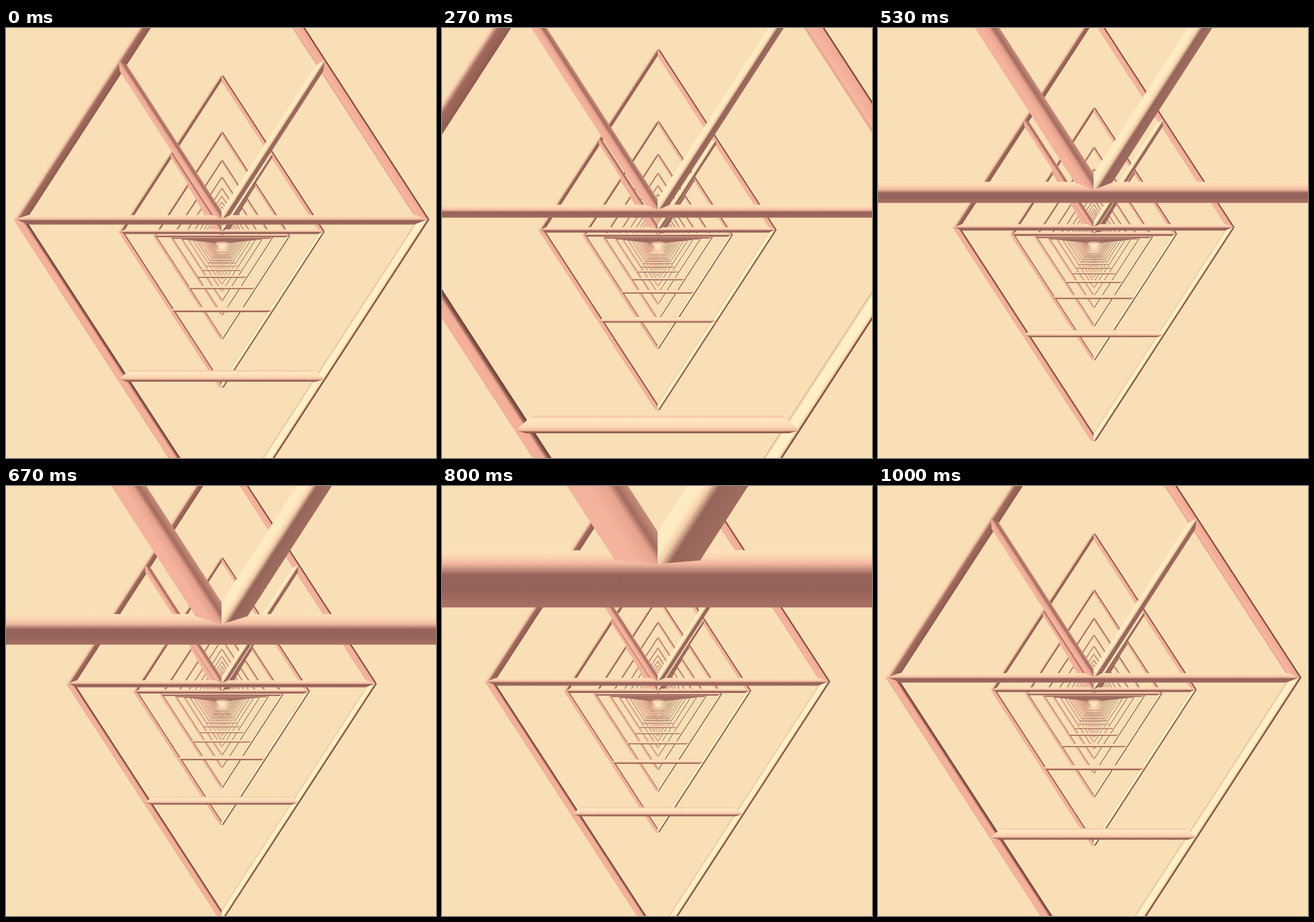
Recreate the animation shown at these times as an HTML page with a canvas. Size 748 by 748 pixels, loop 1.07 s.

```html
<!DOCTYPE html>
<html lang="en">
<head>
<meta charset="utf-8">
<title>Diamond tunnel</title>
<style>
html, body { margin: 0; width: 100%; height: 100%; overflow: hidden; background: #f8dfb5; }
canvas { display: block; }
</style>
</head>
<body>
<canvas id="stage" width="748" height="748"></canvas>
<script>
const ctx = document.getElementById('stage').getContext('2d');
const SIZE = 748, CENTER = 375, FOCAL = 345;
const RINGS = 34, LOOP = 1070, STEPS = 15;

// Ring geometry, in pixels at depth FOCAL
const FRAME_R = 6.8, BAR_R = 8.2;
const HALF_W = 349, HALF_H = 537.5, MID_Y = -41, LOW_Y = 229;
const STEEP = HALF_H / HALF_W, FLAT = 1 / STEEP, BLUNT = -.5;

// Colours across a tube: -1 first edge, 0 front ridge, 1 second edge
const shades = {
  upperLeft: [[-1, '#f3c5a4'], [-.5, '#fbdcb4'], [.08, '#e0a892'], [.3, '#a06a5c'], [1, '#8f5c50']],
  upperRight: [[-1, '#e5a28d'], [-.75, '#f7b7a0'], [0, '#f0a994'], [.3, '#8a5549'], [1, '#6b4037']],
  lowerLeft: [[-1, '#e9a38d'], [-.3, '#f6b39b'], [.55, '#f3ae98'], [.8, '#8a5549'], [1, '#6b4037']],
  lowerRight: [[-1, '#dcb08c'], [-.8, '#fff0c8'], [-.2, '#fff0c8'], [0, '#f3cba6'], [.3, '#8c5d4d'], [1, '#70483b']],
  middle: [[-1, '#fde2ba'], [-.5, '#fbd5b0'], [0, '#f0b79f'], [.25, '#96645a'], [.6, '#95635a'], [1, '#a97064']],
  low: [[-1, '#f3c3a2'], [-.75, '#fee8c2'], [-.2, '#fbd6b2'], [.1, '#eab398'], [.45, '#9c685a'], [1, '#85564a']],
  armLeft: [[-1, '#f3b39c'], [-.5, '#f5b39c'], [0, '#e6a28e'], [.4, '#a26b5e'], [1, '#c98f7c']],
  armRight: [[-1, '#fdecc2'], [-.3, '#fdeac0'], [.05, '#f3cda8'], [.3, '#95655a'], [1, '#a06c5f']]
};

// Round tube parallel to the screen. Each cut holds how far the two
// edges run past the end, as a multiple of their offset from the axis.
function tube(depth, radius, [x1, y1], [x2, y2], startCut, endCut, shade) {
  const len = Math.hypot(x2 - x1, y2 - y1);
  const dx = (x2 - x1) / len, dy = (y2 - y1) / len;
  const nx = -dy, ny = dx;
  const p = nx * x1 + ny * y1, dist = Math.hypot(p, depth);
  const sin = radius / dist, cos = Math.sqrt(1 - sin * sin);

  const silhouette = side => ({
    off: radius * (side * cos * depth - sin * p) / dist,
    z: depth - radius * (side * cos * p + sin * depth) / dist
  });
  const first = silhouette(-1), second = silhouette(1);
  const ridge = { off: 0, z: depth - radius };

  const project = (x, y, dir, edge, cut) => {
    const ext = dir * cut * Math.abs(edge.off), s = FOCAL / edge.z;
    return [CENTER + (x + nx * edge.off + dx * ext) * s,
            CENTER + (y + ny * edge.off + dy * ext) * s];
  };
  const start = (edge, cut) => project(x1, y1, -1, edge, cut);
  const end = (edge, cut) => project(x2, y2, 1, edge, cut);

  const across = edge => (p + edge.off) * FOCAL / edge.z;
  const a = across(first), b = across(second);
  const mid = (across(ridge) - a) / (b - a);
  const fill = ctx.createLinearGradient(
    CENTER + nx * a, CENTER + ny * a, CENTER + nx * b, CENTER + ny * b);
  for (const [t, color] of shade) {
    const stop = t < 0 ? mid * (1 + t) : mid + (1 - mid) * t;
    fill.addColorStop(Math.min(1, Math.max(0, stop)), color);
  }

  ctx.fillStyle = fill;
  ctx.beginPath();
  for (const point of [
    start(first, startCut[0]), start(ridge, 0), start(second, startCut[1]),
    end(second, endCut[1]), end(ridge, 0), end(first, endCut[0])
  ]) ctx.lineTo(...point);
  ctx.fill();
}

function drawRing(depth) {
  const top = [0, MID_Y - HALF_H], bottom = [0, MID_Y + HALF_H];
  const left = [-HALF_W, MID_Y], right = [HALF_W, MID_Y], tip = [0, MID_Y];
  const point = [-1.857, -1.857], round = [-1, -1];
  const frame = (...args) => tube(depth, FRAME_R, ...args);
  const bar = (...args) => tube(depth, BAR_R, ...args);

  frame(left, top, [FLAT, -FLAT], [BLUNT, -STEEP], shades.upperLeft);
  frame(right, top, [-FLAT, FLAT], [-STEEP, BLUNT], shades.upperRight);
  frame(bottom, left, [BLUNT, -STEEP], [FLAT, -FLAT], shades.lowerLeft);
  frame(bottom, right, [-STEEP, BLUNT], [-FLAT, FLAT], shades.lowerRight);
  bar([-174, LOW_Y], [174, LOW_Y], point, point, shades.low);
  bar(left, right, point, point, shades.middle);
  bar(tip, [-174, -310], [-1.84, -1.546], round, shades.armLeft);
  bar(tip, [174, -310], [-1.546, -1.84], round, shades.armRight);
}

function drawGlow() {
  const glow = ctx.createRadialGradient(376, 381, 0, 376, 381, 16);
  glow.addColorStop(0, '#fff0cc');
  glow.addColorStop(.3, 'rgba(253,222,184,.8)');
  glow.addColorStop(1, 'rgba(248,205,172,0)');
  ctx.fillStyle = glow;
  ctx.fillRect(360, 365, 32, 32);
}

function draw(now) {
  // Fifteen even steps per second, on a 10 ms clock, then a short hold
  const time = Math.floor(now % LOOP / 10) * 10;
  const step = Math.floor((time + 3.4) * STEPS / 1000) % STEPS;

  ctx.fillStyle = '#f8dfb5';
  ctx.fillRect(0, 0, SIZE, SIZE);
  for (let i = RINGS - 1; i >= 0; i--) {
    drawRing(FOCAL * (i + .995 - step / STEPS));
    if (i === 9) drawGlow();
  }
}

let began;
function tick(now) {
  began ??= now;
  draw(now - began);
  requestAnimationFrame(tick);
}
draw(0);
requestAnimationFrame(tick);
</script>
</body>
</html>
```
